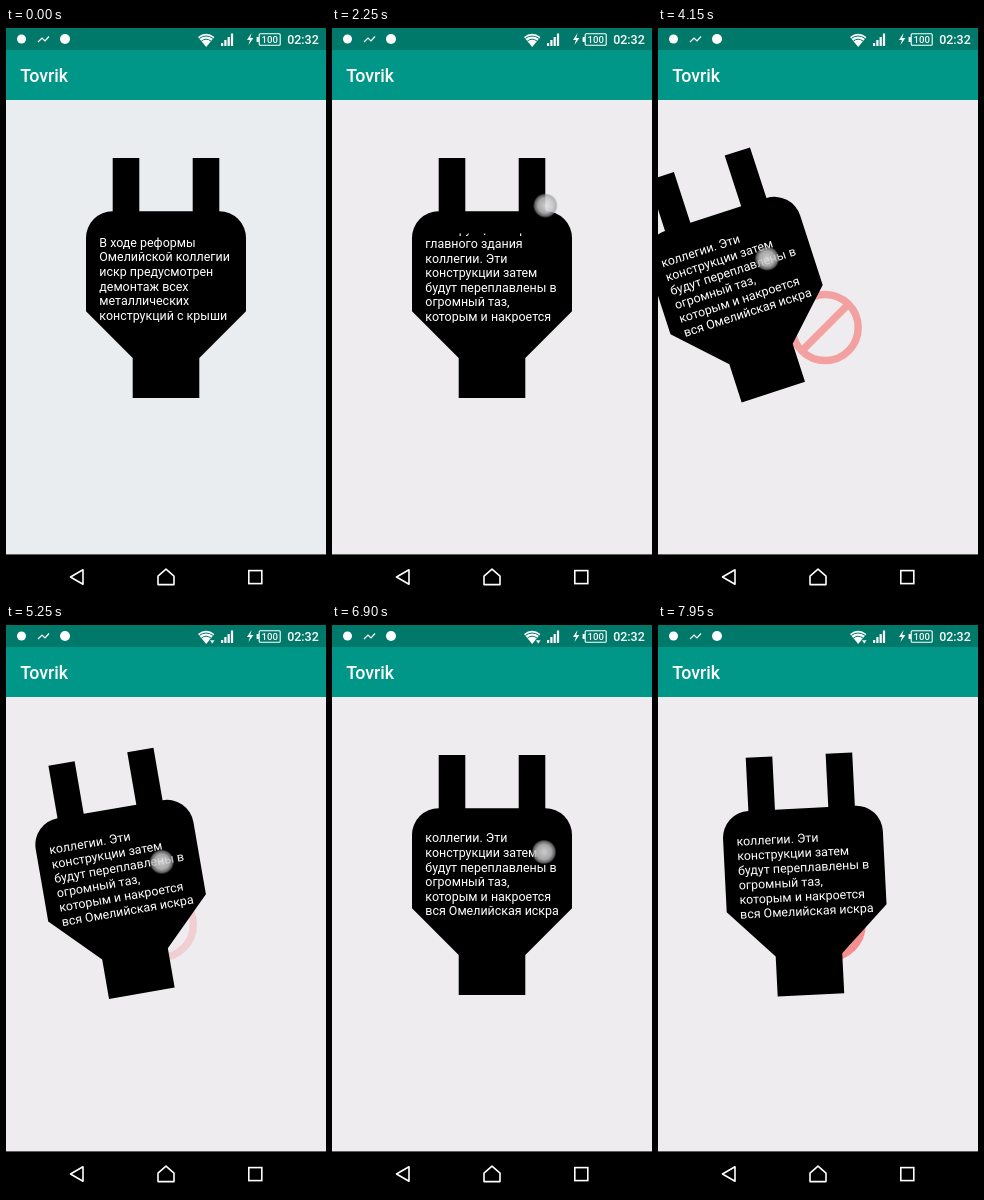
Recreate the animation shown at these times as an HTML page. Size 320 by 569 pixels, loop 8 s.

```html
<!DOCTYPE html>
<html lang="ru">
<head>
<meta charset="utf-8">
<style>
html, body { margin: 0; width: 100%; height: 100%; overflow: hidden; background: #eeecef; }
svg { display: block; width: 100vw; height: 100vh; }
text { font-family: Roboto, sans-serif; fill: #fff; }
</style>
</head>
<body>
<svg viewBox="0 0 320 569" preserveAspectRatio="none">
  <defs>
    <clipPath id="view"><rect x="90" y="205.5" width="140" height="89.2"/></clipPath>
    <radialGradient id="spot">
      <stop offset="0" stop-color="#e2e2e2" stop-opacity=".9"/>
      <stop offset=".6" stop-color="#c4c4c6" stop-opacity=".85"/>
      <stop offset=".85" stop-color="#98989c" stop-opacity=".65"/>
      <stop offset="1" stop-color="#808084" stop-opacity="0"/>
    </radialGradient>
  </defs>
  <rect id="bg" width="320" height="569" fill="#eeecef"/>

  <g id="ban" fill="none" stroke="#fa4646" stroke-width="7.4">
    <circle r="33"/>
    <path d="M-23.3 23.3L23.3 -23.3"/>
  </g>

  <g id="plug">
    <path d="M106.7 130h26.6v53.3h53.4V130h26.6v53.3A26.7 26.7 0 0 1 240 210v73.3L193.3 330v40h-66.6v-40L80 283.3V210a26.7 26.7 0 0 1 26.7 -26.7z"/>
    <g clip-path="url(#view)"><g id="copy" font-size="12.44"></g></g>
  </g>

  <circle id="finger" r="12.5" fill="url(#spot)"/>

  <rect width="320" height="72" fill="#009688"/>
  <rect width="320" height="22" fill="#00796b"/>
  <text x="14.2" y="54.3" font-size="17.78" font-weight="500">Tovrik</text>

  <g fill="#fff">
    <circle cx="15.5" cy="11" r="4.5"/>
    <path d="M32 14l4 -4l3 3l4 -4.5" fill="none" stroke="#fff" stroke-width="1.2"/>
    <circle cx="59" cy="11" r="5"/>
    <path d="M192 9Q200 2.6 208.4 9L200.2 19z"/>
    <path d="M193.4 10.4Q200 5.6 207 10.4M195.4 13Q200 9.4 205 13" fill="none" stroke="#00796b"/>
    <path id="link" d="M203.5 15h5.5l-2.75 4z" stroke="#00796b" stroke-width=".6"/>
    <path d="M215 15h2.2v3H215zM218.3 12h2.2v6h-2.2zM221.6 9h2.2v9h-2.2zM224.9 5.5h2.2V18h-2.2z"/>
    <path d="M245.6 5l-4.6 7h3l-1.6 5l5 -7h-3.2z"/>
    <rect x="253.2" y="5.7" width="21" height="11.6" rx="1" fill="none" stroke="#fff" stroke-width="1.1"/>
    <rect x="250.6" y="9" width="2.2" height="5"/>
    <text x="263.7" y="15" font-size="9.6" font-weight="500" text-anchor="middle">100</text>
    <text x="281.2" y="16" font-size="12.44" font-weight="500">02:32</text>
  </g>

  <rect y="526.4" width="320" height="42.6"/>
  <g fill="none" stroke="#fff" stroke-width="1.6" stroke-linejoin="round">
    <path d="M64.5 549L77 541.8V556.2z"/>
    <path d="M160 541.2L152 548.2V556.6H168V548.2z"/>
    <rect x="242.8" y="542.6" width="13" height="13" stroke-linejoin="miter"/>
  </g>
</svg>
<script>
const LOOP = 8000, STEP = 50, LINE = 14.6, REACH = 93;
const $ = id => document.getElementById(id);
const lines = [
  'В ходе реформы', 'Омелийской коллегии', 'искр предусмотрен', 'демонтаж всех',
  'металлических', 'конструкций с крыши', 'главного здания', 'коллегии. Эти',
  'конструкции затем', 'будут переплавлены в', 'огромный таз,',
  'которым и накроется', 'вся Омелийская искра'
];
lines.forEach((s, i) => {
  const el = document.createElementNS('http://www.w3.org/2000/svg', 'text');
  el.setAttribute('x', 93.3);
  el.setAttribute('y', 218.8 + i * LINE);
  el.textContent = s;
  $('copy').append(el);
});

// smooth 0..1 ramp beginning at `from`
function ramp(t, from, span) {
  const p = Math.min(1, Math.max(0, (t - from) / span));
  return p * p * (3 - 2 * p);
}

function place(id, x, y, rest = '') {
  $(id).setAttribute('transform', `translate(${x} ${y})${rest}`);
}

function draw(t) {
  const scroll = 103.6 * ramp(t, 848, 1890);
  const out = ramp(t, 3450, 895), back = ramp(t, 4750, 900), settle = ramp(t, 5950, 550);
  const again = ramp(t, 6900, 800), spring = ramp(t, 7700, 327);
  const dx = REACH * (spring - again - out) + (REACH - 10) * back + 10 * settle;
  const released = t > 7700;

  $('bg').setAttribute('fill', t < 650 ? '#e9edf0' : '#eeecef');
  place('copy', 0, -scroll);
  place('plug', dx, 0, ` rotate(${dx * 0.22} 160 250)`);

  // the sign slides out with the drag and lingers after release
  const pull = released ? REACH : Math.max(0, -dx);
  place('ban', 139 + 0.345 * pull, 299.5);
  $('ban').setAttribute('opacity', 0.56 * (pull / REACH) ** 1.6);

  const scrolling = t >= 750 && t < 2600;
  const dragging = t >= 3500 && !released;
  $('finger').setAttribute('opacity', scrolling || dragging ? 1 : 0);
  if (scrolling) place('finger', 197.7 + 0.182 * scroll, 264 - scroll);
  else place('finger', 212 + 1.26 * dx, 227 + 4 * out + 10 * back - 14 * settle);
  $('link').setAttribute('opacity', t >= 4800 ? 1 : 0);
}

const start = performance.now();
function tick() {
  const t = (performance.now() - start) % LOOP;
  draw(Math.floor(t / STEP) * STEP);
  requestAnimationFrame(tick);
}
tick();
</script>
</body>
</html>
```
